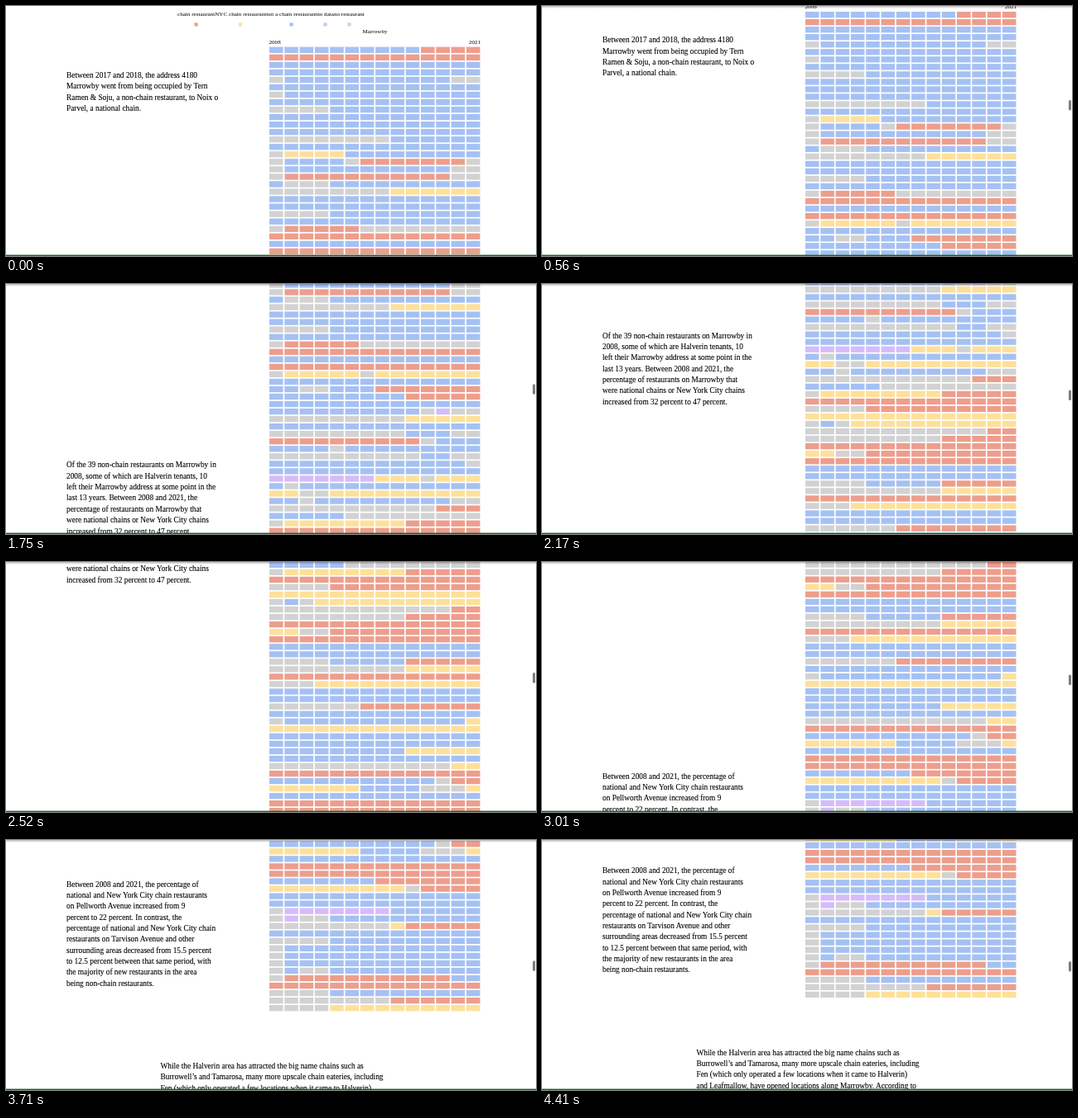
Animation, 640 px wide and 303 px high, one loop 4550 ms. Source, as an HTML page:

```html
<!DOCTYPE html>
<html lang="en">
<head>
<meta charset="utf-8">
<title>Restaurant timeline</title>
<style>
  html, body { margin: 0; width: 100%; height: 100%; overflow: hidden; background: #fff; }
  svg { display: block; width: 100%; height: 100%; }
  text { font-family: "Liberation Serif", "Times New Roman", serif; font-size: 7.11px; fill: #000; }
  .body { font-size: 9.35px; stroke: #000; stroke-width: .1px; }
  .mid { text-anchor: middle; }
</style>
</head>
<body>
<svg viewBox="0 0 640 303" preserveAspectRatio="xMinYMin meet">
  <defs>
    <linearGradient id="fade" x2="0" y2="1">
      <stop offset="0" stop-color="#000" stop-opacity=".28"/>
      <stop offset="1" stop-color="#000" stop-opacity="0"/>
    </linearGradient>
  </defs>
  <g id="page"></g>
  <g id="chrome">
    <rect width="640" height="3" fill="url(#fade)"/>
    <rect id="thumb" x="636" width="3" height="12.6" rx="1.5" fill="#7c7c7c"/>
  </g>
  <rect y="301.6" width="640" height="1.4" fill="#0b6b1d"/>
</svg>
<script>
const LOOP = 4550, STEP = 70, LAST = 4410;
const LEFT = 318, TOP = 49.6, COLS = 14, COL = 18.3, ROW = 9.04, GAP = 1.7;
const COLORS = { r: '#ed9e8d', y: '#fde09a', b: '#a5c1f3', p: '#d6bbfa', g: '#d2d2d2' };

// One word per address: colour and run length; the last run fills the row.
const ROWS = `
  b10r r b b gb11g b gb b g4b b b b g8b b gy4b gb4gr7g gb11g gr11g bg3b g8y
  b b g4b b gr5g r b r gy5gy b b2g2b3r b9r b b10gpg g9y b g9b3g r10gb b4gb g10b2g
  b13g b p7y3gy bgb y2g2y b2gb9g g11r b5g gy8r r g4r y gbgy g12r g9r r y2g2r r b b
  g4b5r g9y r g3y b b g6r b gb12y y b b b9y b g12y r b11gr y6b4g3y b r
  r b7r y9gr b b gp7b gpg2b g8yr b g4b gb gb gb gbg2b gr11b r g4b g8r g4y
`.trim().split(/\s+/);

const LEGEND = [
  ['chain restaurant', 229.6, COLORS.r],
  ['NYC chain restaurant', 283, COLORS.y],
  ['not a chain restaurant', 344.6, COLORS.b],
  ['no data', 385.6, '#ccc3f4'],
  ['no restaurant', 414.5, COLORS.g]
];

const PARAGRAPHS = [
  [73, 87, `Between 2017 and 2018, the address 4180
Marrowby went from being occupied by Tern
Ramen & Soju, a non-chain restaurant, to Noix o
Parvel, a national chain.`],
  [73, 419.4, `Of the 39 non-chain restaurants on Marrowby in
2008, some of which are Halverin tenants, 10
left their Marrowby address at some point in the
last 13 years. Between 2008 and 2021, the
percentage of restaurants on Marrowby that
were national chains or New York City chains
increased from 32 percent to 47 percent.`],
  [73, 792, `Between 2008 and 2021, the percentage of
national and New York City chain restaurants
on Pellworth Avenue increased from 9
percent to 22 percent. In contrast, the
percentage of national and New York City chain
restaurants on Tarvison Avenue and other
surrounding areas decreased from 15.5 percent
to 12.5 percent between that same period, with
the majority of new restaurants in the area
being non-chain restaurants.`],
  [186.5, 1012.5, `While the Halverin area has attracted the big name chains such as
Burrowell’s and Tamarosa, many more upscale chain eateries, including
Fen (which only operated a few locations when it came to Halverin)
and Leafmallow, have opened locations along Marrowby. According to`]
];

// Scroll path: time, offset, speed
const PATH = [
  [0, 0, 0], [1050, 106.3, .113], [1750, 197, .19], [2520, 474.8, .168],
  [3010, 529.3, .16], [3710, 735.5, .044], [LAST, 751.8, 0]
];

const page = document.getElementById('page');
const chrome_ = document.getElementById('chrome');
const thumb = document.getElementById('thumb');

function add(tag, attrs, content = '') {
  const el = document.createElementNS('http://www.w3.org/2000/svg', tag);
  for (const key in attrs) el.setAttribute(key, attrs[key]);
  el.textContent = content;
  page.append(el);
}

function box(x, y, width, height, fill) {
  add('rect', { x, y, width, height, fill });
}

function label(x, y, content, name = '') {
  add('text', { x, y, class: name }, content);
}

function build() {
  ROWS.forEach((row, i) => {
    const runs = [...row.matchAll(/([a-z])(\d*)/g)];
    let col = 0;
    runs.forEach(([, key, len], k) => {
      const n = k === runs.length - 1 ? COLS - col : +len || 1;
      box(LEFT + col * COL, TOP + i * ROW, n * COL - GAP, ROW - GAP, COLORS[key]);
      col += n;
    });
  });
  for (let c = 1; c < COLS; c++) {
    box(LEFT + c * COL - GAP, TOP, GAP, ROWS.length * ROW, '#fff');
  }

  label(207, 11.6, LEGEND.map(item => item[0]).join(''));
  LEGEND.forEach(([, x, color]) => box(x - 2.1, 20.3, 4.2, 4.2, color));
  label(445.5, 33.4, 'Marrowby', 'mid');
  label(317.5, 45.8, '2008');
  label(559, 45.8, '2021');

  PARAGRAPHS.forEach(([x, y, content]) =>
    content.split('\n').forEach((line, i) => label(x, y + i * 13.35, line, 'body')));
}

// Cubic Hermite between the path points
function scrollAt(t) {
  const i = Math.max(1, PATH.findIndex(p => p[0] >= t));
  const [t0, y0, v0] = PATH[i - 1], [t1, y1, v1] = PATH[i];
  const d = t1 - t0, s = (t - t0) / d, q = 1 - s;
  return y0 * (1 + 2 * s) * q * q + v0 * d * s * q * q
       + y1 * (3 - 2 * s) * s * s - v1 * d * q * s * s;
}

function draw() {
  const now = performance.now() % LOOP;
  const t = Math.min(LAST, Math.floor(now / STEP) * STEP);
  const y = scrollAt(t);
  page.setAttribute('transform', `translate(0 ${-y.toFixed(2)})`);
  thumb.setAttribute('y', (112 + y * .0465).toFixed(2));
  chrome_.setAttribute('visibility', t > 0 ? 'visible' : 'hidden');
  requestAnimationFrame(draw);
}

build();
draw();
</script>
</body>
</html>
```
